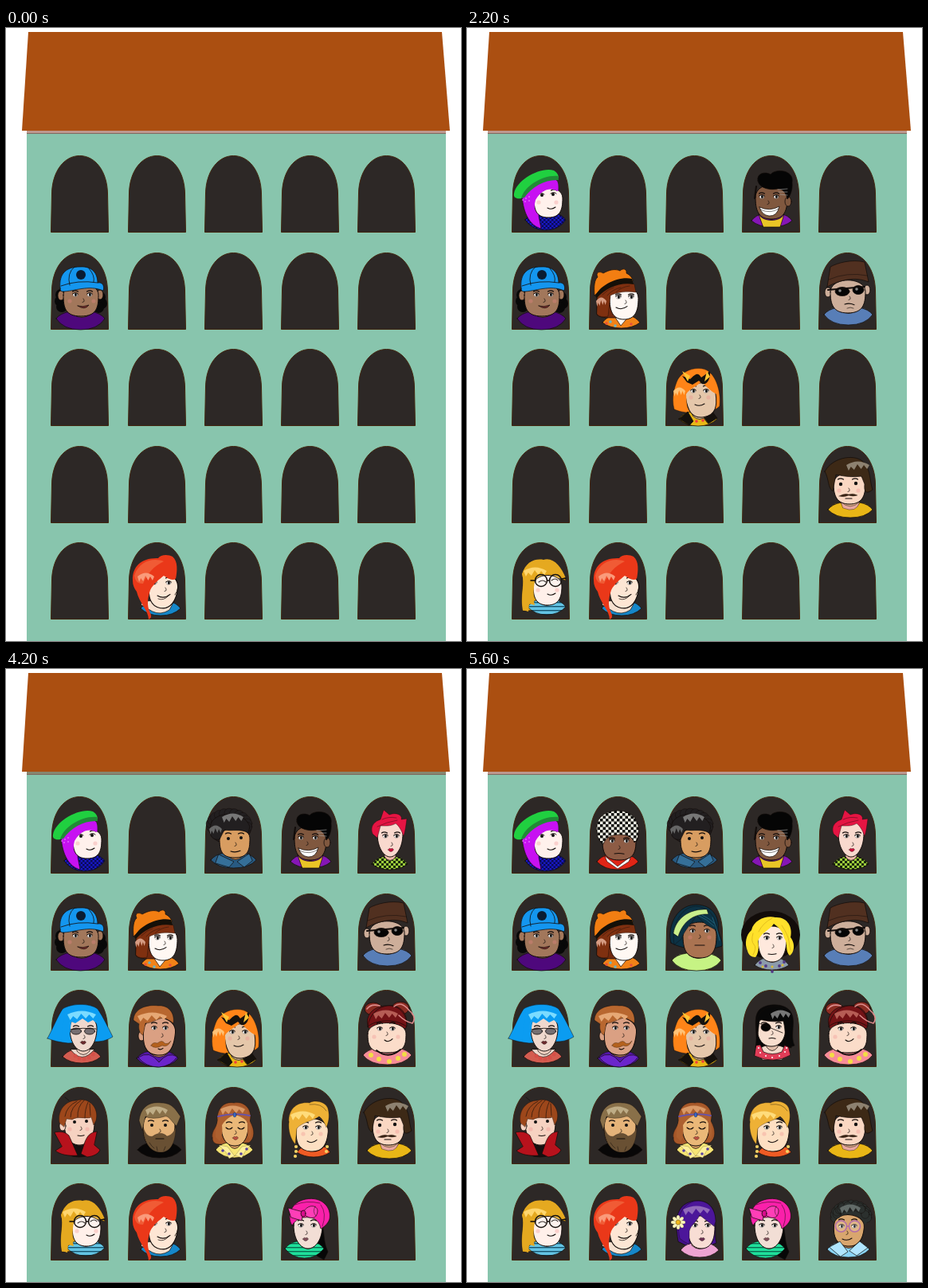
An HTML page that plays this animation: 571x770 px, repeating every 6100 ms.

```html
<!DOCTYPE html>
<html lang="en">
<head>
<meta charset="utf-8">
<title>Neighbours</title>
<style>
html, body { margin: 0; width: 100%; height: 100%; overflow: hidden; background: #fff; }
svg { display: block; width: 100%; height: 100%; }
</style>
</head>
<body>
<svg id="stage" viewBox="0 0 571 770"></svg>
<script>
const LOOP = 6100;
const colX = [56, 153, 249, 345, 441], rowY = [160, 282, 403, 525, 646];

const shape = (fill, d, w = .7) => `<path d="${d}" fill="${fill}" stroke-width="${w}"/>`;
const line = (d, w = 1) => shape('none', d, w);
const oval = (fill, x, y, rx, ry = rx, w = .8) =>
  `<ellipse cx="${x}" cy="${y}" rx="${rx}" ry="${ry}" fill="${fill}" stroke-width="${w}"/>`;
const dots = (fill, r, ...pts) => pts.map(([x, y]) => oval(fill, x, y, r, r, 0)).join('');
const turn = (deg, x, y, art) => `<g transform="rotate(${deg} ${x} ${y})">${art}</g>`;

// Shoulders from l to r, with a rounded lower edge at b.
function torso(fill, l, r, y, b) {
  const w = r - l, m = (l + r) / 2;
  return shape(fill, `M${l},${y + 9}Q${l + 5},${y + 2} ${l + w * .3},${y}H${r - w * .3}Q${r - 5},${y + 2} ${r},${y + 9}Q${r - 9},${b} ${m},${b}Q${l + 9},${b} ${l},${y + 9}Z`);
}
const neck = (fill, x, y, w = 9) => shape(fill, `M${x - w},${y - 10}V${y}Q${x},${y + 9} ${x + w},${y}V${y - 10}`);
function head(fill, x, y, rx, ry, jaw = .6) {
  return shape(fill, `M${x - rx},${y - ry * .2}C${x - rx},${y - ry * 1.1} ${x + rx},${y - ry * 1.1} ${x + rx},${y - ry * .2}C${x + rx},${y + ry * .5} ${x + rx * jaw},${y + ry} ${x},${y + ry}C${x - rx * jaw},${y + ry} ${x - rx},${y + ry * .5} ${x - rx},${y - ry * .2}Z`, 1);
}
const brows = (x, y, gap) => [-1, 1].map(s => line(`M${x + s * (gap - 3.5)},${y}q${s * 4},-2.4 ${s * 7},0`, 1.2)).join('');
const eyes = (x, y, gap) => [-gap, gap].map(d =>
  oval('#fff', x + d, y, 2.9, 2.3, .3) + oval('#111', x + d + .4, y, 1.5, 2, 0) + line(`M${x + d - 3.5},${y - 1}q4,-3 7,0`, 1)).join('');
const nose = (x, y) => line(`M${x},${y - 3}q3,4 -1,4.5`, .7);
const smile = (x, y, w = 6, bend = 4) => line(`M${x - w},${y}q${w},${bend} ${w * 2},${-bend / 3}`, 1.1);
const lips = (fill, x, y) => shape(fill, `M${x - 3.5},${y}q2,-3 3.5,-1q2,-2 3.5,1q-3.5,5 -7,0z`, .4);
const blush = (x, y, gap) => dots('#f08a8a50', 2.6, [x - gap, y], [x + gap, y]);
const looks = (x, y, gap, drop = 15, bend = 4) =>
  blush(x, y + 8, gap + 3) + brows(x, y - 6, gap) + eyes(x, y, gap) + nose(x, y + 8) + smile(x, y + drop, 6, bend);
const shine = (fill, x, y, w) => shape(fill, `M${x},${y}q${w / 2},-9 ${w},0l${-w * .1},5l${-w * .14},-5l${-w * .12},5l${-w * .16},-6l${-w * .14},7l${-w * .14},-4l${-w * .1},5z`, 0);
const curls = (fill, x, y, rx, ry, n, r, from = .95, sweep = 1.1) => Array.from({ length: n }, (_, i) => {
  const a = Math.PI * (from + sweep * i / (n - 1));
  return oval(fill, x + rx * Math.cos(a), y + ry * Math.sin(a), r, r, .4);
}).join('');
const specs = (x, y, gap, r, color) =>
  `<g stroke="${color}">${oval('#ffffff30', x - gap, y, r, r, 1.5)}${oval('#ffffff30', x + gap, y, r, r, 1.5)}${line(`M${x - gap + r},${y}h${2 * (gap - r)}`, 1.5)}</g>`;

// Each resident: row, column, moments of appearing or leaving, drawing in window coordinates.
const people = [
  [0, 0, [1200], () => torso('url(#plaid)', 17, 68, 72, 94)
    + shape('#c711f2', 'M13,52C20,36 42,26 56,30L60,48C48,44 42,46 36,52L34,76L37,92C22,88 15,72 13,52Z')
    + head('#fff1ec', 46, 58, 18, 20, .85) + brows(45, 44, 8) + dots('#111', 2, [38, 50], [52, 49])
    + line('M34,49q4,-3 7,0M49,48q4,-3 7,0', 1) + blush(45, 59, 11) + smile(50, 66, 5, 3)
    + shape('#c711f2', 'M20,46C30,32 48,28 57,32C59,36 59,42 58,45C49,40 38,42 30,56C27,68 29,76 35,90C25,84 18,66 20,46Z', 0)
    + dots('#f3a5ff', .8, [14, 56], [18, 54], [22, 52], [17, 58], [22, 57])
    + shape('#20d040', 'M3,48C6,31 36,14 53,19C58,22 60,27 58,30C42,28 24,38 12,54C6,55 2,53 3,48Z', 0)
    + shape('#218a37', 'M12,54C16,38 40,24 58,26L59,31C42,30 26,39 16,53Z', 0)],

  [0, 1, [5400], () => torso('#e02516', 10, 62, 73, 92) + shape('#fff', 'M20,75L36,88L53,75L50,82L36,91L23,82Z', .6)
    + neck('#7f503b', 37, 75) + oval('#080808', 37, 50, 25, 16) + head('#8d5c45', 38, 59, 21, 21, .9) + brows(38, 53, 9) + eyes(38, 56, 9)
    + nose(38, 65) + smile(38, 72, 6, -1)
    + shape('url(#check)', 'M10,46C6,28 20,18 36,18C54,18 64,30 62,46C62,52 60,56 57,58C55,51 48,48 38,48C27,48 21,52 18,60C13,57 11,52 10,46Z')],

  [0, 2, [3400], () => torso('#285a82', 8, 65, 71, 90) + neck('#bd844f', 39, 75)
    + oval('#221f20', 32, 38, 27, 22) + head('#d89d61', 38, 57, 19, 20, .9) + brows(38, 47, 8) + dots('#111', 2, [30, 53], [46, 52])
    + nose(39, 61) + smile(39, 69, 6, 2)
    + curls('#221f20', 31, 36, 23, 15, 13, 6) + shape('#221f20', 'M9,32C18,18 50,18 57,38L55,46C46,40 34,44 25,42L19,54C8,56 4,46 9,32Z')
    + shine('#777', 22, 26, 27) + shine('#666', 6, 41, 16)
    + shape('#356f98', 'M18,73L37,82L31,89L14,84ZM56,72L41,82L50,89L60,81Z')],

  [0, 3, [400], () => torso('#8516b5', 12, 63, 73, 90) + shape('#e9c526', 'M21,74C26,84 48,84 53,74L48,90H27Z') + neck('#69472f', 37, 76)
    + head('#80583f', 37, 57, 20, 23, .85) + oval('#80583f', 58, 58, 4, 6)
    + brows(34, 48, 9) + eyes(34, 52, 9) + nose(33, 60)
    + shape('#fff', 'M22,65Q35,71 47,64Q44,77 34,76Q25,75 22,65Z') + line('M23,68Q36,74 46,67', .5)
    + shape('#050505', 'M20,32C18,22 30,20 36,24C42,16 66,18 63,34C64,44 60,52 57,55C55,46 51,42 45,42C36,44 22,42 20,32Z') + line('M16,54L18,39', 2)
    + `<g stroke="#aaa">${line('M45,43l12,-1M46,46l11,0M48,49l9,1', .6)}</g>`],

  [0, 4, [2600], () => torso('url(#lime)', 18, 63, 76, 92) + neck('#eeb9a9', 41, 76, 7)
    + head('#f9d9ce', 41, 52, 16, 24, .5) + brows(42, 46, 8) + eyes(42, 50, 7) + nose(43, 61) + lips('#d4103c', 42, 67)
    + shape('#e51543', 'M19,47C15,36 23,31 29,29L33,17L40,23C51,19 57,25 55,29L62,28C61,36 60,44 58,50C55,42 52,37 48,34C42,38 34,37 29,37L25,52Z', .4)
    + line('M25,38q12,-6 25,-8M31,29q8,-4 18,-2', .4)],

  [1, 0, [0, 200, 1400], () => dots('#080808', 7, [13, 53], [12, 61], [14, 68], [62, 56], [64, 64], [60, 69])
    + torso('#4e087c', 7, 68, 74, 97) + neck('#805c45', 39, 77, 12) + oval('#a2775b', 13, 54, 4, 6) + oval('#a2775b', 62, 53, 4, 6)
    + head('#a2775b', 38, 58, 22, 22, .9) + brows(40, 49, 9) + eyes(40, 53, 9) + nose(41, 61) + blush(39, 61, 15)
    + shape('#7e2d2d', 'M34,67Q41,69 48,66Q43,73 34,67Z', .7)
    + shape('#1496ef', 'M12,45C10,26 20,18 37,18C53,17 59,27 59,38C65,37 68,42 66,48C48,40 29,49 15,49Q12,49 12,45Z')
    + line('M13,42Q34,34 59,38M30,18Q20,26 24,41M48,20Q56,29 54,37', .8) + oval('#0a1c33', 38, 28, 6, 6, 0)],

  [1, 1, [600], () => torso('#f28218', 17, 64, 79, 95) + shape('#fff6ef', 'M32,80L40,92L51,79Z')
    + shape('#71290e', 'M10,46C18,34 48,30 57,46L61,72L34,82C22,82 12,82 10,78Z')
    + head('#fff8f3', 44, 62, 18, 22, .8) + brows(45, 53, 8) + eyes(45, 56, 8) + nose(46, 63) + smile(41, 69, 7, 4)
    + shape('#7f3010', 'M11,52C20,36 48,32 57,40L59,50C47,48 35,50 27,54L24,80C17,82 12,80 10,77Z', .4)
    + line('M17,53q7,-7 14,-9M23,54q7,-8 17,-10M34,50q7,-7 17,-8', .4) + shine('#d69c83', 9, 61, 13)
    + shape('#f27e12', 'M7,54C6,42 7,34 11,31C8,25 13,23 18,26C25,22 33,20 39,23C43,19 48,21 47,26C53,29 55,33 55,36C38,33 22,40 7,54Z')
    + shape('#151008', 'M8,55C13,41 38,29 54,33L56,40C39,37 22,44 10,57Z', 0)
    + dots('#68b3c4', 1.8, [27, 87], [33, 92]) + dots('#e6503c', 1.7, [53, 90], [22, 89])],

  [1, 2, [4600], () => shape('#0c3244', 'M7,62C2,46 11,15 38,14C62,14 68,33 66,45C69,55 72,60 71,66C56,72 24,72 7,62Z')
    + torso('#c6f384', 8, 70, 75, 97) + neck('#895337', 41, 77, 12) + head('#aa7351', 43, 57, 21, 24, .85) + looks(43, 47, 9, 18, 0)
    + shape('#0c3244', 'M11,64C7,43 18,17 38,16C56,17 65,32 64,46C54,42 44,34 39,27C32,40 25,44 20,57Z', .4)
    + shape('#c9ef8c', 'M10,50C13,31 30,19 52,20L54,26C37,25 22,34 16,54Z', .5)
    + `<g stroke="#287089">${line('M42,28q10,4 19,13M46,27q10,5 15,10M59,30q6,14 9,29', .7)}</g>`],

  [1, 3, [4800], () => curls('#f4d21d', 35, 54, 26, 21, 17, 8, .72, 1.56) + torso('#8c9bab', 16, 59, 81, 96) + neck('#eccbbf', 38, 82)
    + oval('#f4d21d', 36, 52, 27, 20, 20, 0) + head('#ffe9dd', 38, 62, 18, 24, .7)
    + brows(39, 51, 8) + eyes(39, 56, 8) + nose(39, 67) + smile(38, 76, 5, 1)
    + shape('#ffe12b', 'M7,72C3,63 5,52 12,46C15,32 32,27 42,30C57,29 64,42 61,55C68,64 65,75 60,78C54,73 58,62 53,56C51,46 45,42 40,38C35,46 24,49 20,60C22,68 20,77 17,80C12,80 8,77 7,72Z', 0)
    + `<g stroke="#cfa316">${line('M14,50q-3,10 1,14t-1,13M50,40q8,12 9,20t2,11M38,31q-12,6 -17,17', .6)}</g>`
    + dots('#523b85', 1.9, [23, 87], [30, 91], [38, 98], [47, 91], [53, 86]) + dots('#d8bd32', 1.5, [26, 92], [38, 92], [51, 90])],

  [1, 4, [1000], () => torso('#587eb7', 7, 68, 69, 91) + neck('#ad8d7a', 38, 72, 11)
    + oval('#cdae9a', 12, 50, 4, 6) + oval('#cdae9a', 61, 47, 4, 6) + head('#cdae9a', 37, 54, 22, 22, .85)
    + oval('#050505', 30, 49, 9, 5.5) + oval('#050505', 50, 47, 7, 5.5) + line('M12,47L58,43', 2)
    + dots('#888', 1.8, [27, 48], [48, 46]) + nose(39, 58) + smile(39, 65, 6, -2) + line('M36,70q4,-2 8,0', .6)
    + shape('#513020', 'M11,43L15,18C24,13 42,8 58,12L63,37C46,30 28,34 11,43Z') + line('M13,34Q36,24 61,29', .5)],

  [2, 0, [2400], () => shape('#0b9cf1', 'M-4,61C3,48 9,33 15,24C26,17 48,16 59,24C66,34 73,49 78,59C70,64 63,65 57,65L22,67C12,66 3,64 -4,61Z', .5)
    + torso('#d35c50', 15, 63, 75, 92) + shape('#efd8cd', 'M25,75Q39,94 55,75Z') + neck('#edcebf', 41, 77, 8) + head('#efd8cd', 41, 53, 17, 24, .55)
    + brows(41, 46, 9) + oval('#766f72', 32, 52, 6.5, 4) + oval('#766f72', 49, 52, 6.5, 4) + line('M23,50q18,-3 34,-1', .9)
    + nose(42, 60) + lips('#702c2f', 41, 66)
    + shape('#0b9cf1', 'M18,27C33,20 52,20 61,28L60,44L53,38L47,41L40,36L31,42L26,40L23,64L13,64Z', 0)
    + shine('#7bdbff', 21, 31, 36) + dots('#d64f47', 2.5, [31, 83], [36, 86], [42, 87], [48, 85], [53, 81])],

  [2, 1, [3000, 4600, 5600], () => torso('#5417a8', 11, 63, 77, 97) + neck('#bb8061', 39, 80, 11)
    + oval('#daa083', 17, 58, 4, 6) + turn(5, 38, 59, head('#daa083', 39, 57, 20, 25, .8)) + brows(40, 42, 7)
    + eyes(40, 48, 7) + nose(43, 58)
    + shape('#b4611e', 'M29,70Q31,65 37,67Q43,62 46,67Q50,69 54,64Q50,73 43,70Q34,75 29,70Z', .3) + smile(41, 74, 3, 2)
    + shape('#b8672f', 'M7,38C7,24 23,18 38,20C51,19 59,29 57,42C52,38 48,36 44,35C36,37 29,42 22,42L19,57C14,55 13,47 14,43Z', .4) + shine('#e6a875', 12, 33, 37)
    + shape('#6b25cb', 'M13,85Q27,75 39,91Q50,77 62,84Q54,96 39,97Q22,97 13,85Z')],

  [2, 2, [800], () => shape('#ff8418', 'M11,76C7,60 12,48 14,42C20,25 45,20 55,29C65,37 70,57 68,72C57,83 27,83 11,76Z', .4)
    + torso('#e8b816', 17, 65, 79, 97) + shape('#15110d', 'M17,88L28,79L35,91L30,96ZM46,84L59,79L65,87L54,94Z')
    + neck('#d9b692', 43, 84) + turn(-8, 45, 64, head('#e5c7aa', 45, 63, 19, 23, .8)) + looks(43, 53, 8, 17, 3)
    + shape('#ff8418', 'M13,72C9,47 18,29 36,27C53,24 66,38 66,58C56,53 50,46 45,41C39,48 30,50 26,57L27,76Z', 0) + shine('#ffc276', 10, 53, 15)
    + shape('#16120d', 'M21,34L31,38C38,31 41,29 45,36L56,28C57,38 52,46 46,44L42,40L34,45L27,42Z', 0)
    + shape('#ffc535', 'M21,28L31,34L28,41ZM52,28L56,35L49,41Z', 0) + dots('#f03d3d', 1.8, [39, 91], [47, 90])],

  [2, 3, [5400], () => shape('#080808', 'M17,72C21,53 12,34 23,24C34,16 56,17 62,29C68,39 60,59 66,70L54,74H21Z')
    + shape('#f3dacb', 'M18,76Q37,62 60,76L50,88H26Z') + shape('#e13c57', 'M18,70L23,69L27,78Q38,83 50,78L54,69L58,70L61,82Q40,94 16,83Z')
    + neck('#dfbda9', 38, 72, 7) + head('#f7dece', 37, 51, 18, 20, .65)
    + brows(37, 42, 9) + eyes(38, 47, 8) + nose(38, 55) + smile(38, 61, 4, -1) + oval('#050505', 30, 47, 6, 5) + line('M19,41L51,54', .8)
    + shape('#080808', 'M18,45C18,28 29,20 45,21C59,23 63,37 60,55L62,73L54,70C55,58 54,47 52,39C40,41 29,39 22,37L20,56Z') + shine('#777', 36, 30, 25)
    + dots('#fff', 1, [21, 73], [23, 79], [30, 83], [38, 85], [47, 83], [54, 78], [56, 73])],

  [2, 4, [3600], () => oval('#8b2d23', 20, 24, 11, 8) + oval('#8b2d23', 54, 23, 11, 8)
    + shape('#731316', 'M14,48C7,30 24,19 38,20C54,18 65,30 61,48Z') + torso('#f78c98', 7, 68, 73, 94) + neck('#e4b59d', 38, 75, 12)
    + head('#fbdcc9', 37, 59, 24, 20, .95) + brows(36, 42, 8) + eyes(36, 49, 8) + nose(37, 56) + blush(36, 59, 15) + smile(39, 63, 5, 4)
    + shape('#731316', 'M13,46C15,30 27,21 38,20C52,19 62,30 62,46C55,42 49,39 38,39C28,39 19,41 13,46Z') + shine('#b65d55', 20, 30, 31)
    + `<g stroke="#dc8b8b">${line('M12,24Q17,17 28,20M46,21Q55,13 65,26Q75,34 69,42Q60,40 52,32', 1.6)}</g>`
    + dots('#f3dc45', 3, [17, 82], [27, 87], [51, 86], [59, 81], [40, 90]) + line('M24,76Q39,88 54,75', 1.8)],

  [3, 0, [2600], () => torso('#151010', 12, 59, 69, 88) + neck('#e6b09a', 37, 69)
    + head('#f6d2c1', 36, 50, 19, 23, .6) + oval('#f6d2c1', 15, 49, 4, 6) + brows(37, 38, 8) + dots('#111', 2, [30, 44], [45, 43])
    + blush(35, 53, 11) + nose(38, 53) + smile(38, 61, 4, 1)
    + shape('#9d471b', 'M11,45C8,28 20,17 32,17C49,12 61,27 57,42L54,48L51,38C44,41 34,36 27,41L20,40L17,50Z', .4)
    + line('M18,37Q20,24 33,18M25,38Q25,25 38,17M34,38Q33,25 42,17M43,39Q43,28 47,19M50,36L49,21M23,17l-5,-4', .6)
    + shape('#b7121c', 'M5,57C13,55 19,57 23,61L34,86C22,87 12,85 6,80L14,75ZM58,56C49,57 46,62 43,69L38,84L46,88C54,87 60,84 62,79L55,73Z')],

  [3, 1, [3800], () => torso('#080707', 12, 67, 70, 89) + neck('#c68b51', 39, 72, 11)
    + head('#e5b379', 39, 53, 20, 25, .8)
    + shape('#695033', 'M19,50C22,61 27,63 31,62C38,57 44,57 49,62C56,60 58,56 60,50C60,69 54,81 43,82C28,83 20,70 19,50Z', .3)
    + brows(38, 43, 9) + dots('#111', 2, [30, 48], [47, 48]) + nose(40, 56) + smile(40, 65, 5, 0)
    + shape('#897049', 'M14,42C16,25 27,18 42,20C56,20 60,29 66,37L61,49C55,44 51,35 46,37C37,40 27,40 22,37L18,54Z', .4) + shine('#beac86', 22, 29, 28)
    + line('M27,70q3,5 6,7M36,75l1,5M47,75l-2,5', .5)],

  [3, 2, [3200], () => shape('#a75829', 'M10,64C8,54 18,50 16,39C17,25 26,18 37,20C52,17 61,31 57,43C64,54 63,65 56,70L19,72C13,72 10,69 10,64Z', .4)
    + torso('#f6e575', 14, 61, 70, 89) + neck('#d89e61', 38, 73, 7) + head('#eab878', 38, 53, 17, 21, .65)
    + brows(39, 45, 8) + line('M27,51q4,4 8,0M42,51q4,4 8,0', 1.1) + nose(39, 58) + lips('#c35444', 39, 64)
    + shape('#ad602f', 'M14,63C13,52 18,40 20,31C28,20 50,20 55,32C57,46 61,54 57,66C52,60 56,48 53,43C48,38 43,36 38,35C30,38 25,43 22,48C23,57 22,66 19,68Z', 0) + shine('#d99966', 20, 28, 31)
    + `<g stroke="#6552ad">${line('M17,37Q38,32 57,36', 1.8)}</g>` + oval('#3a67c2', 38, 35, 2, 3, .3)
    + shape('#fff09a', 'M18,73L29,75L38,87L47,75L58,73L51,81L47,89L39,86L31,90L27,82Z', .2) + dots('#5740a0', 1.8, [23, 80], [31, 84], [46, 84], [53, 78])],

  [3, 3, [4200], () => torso('#ef5b24', 20, 62, 73, 88) + neck('#efbd98', 42, 76, 11)
    + turn(5, 39, 59, head('#fddfc2', 39, 59, 20, 22, .8)) + looks(39, 51, 8, 17, 4)
    + shape('#eeb136', 'M10,44C9,27 21,18 36,20C42,16 56,18 59,27C62,38 59,46 57,51C55,45 52,40 48,37C40,43 27,44 20,52L18,72C12,65 9,55 10,44Z', .3)
    + shine('#ffdc7b', 12, 35, 31) + line('M36,22Q51,20 57,30', .4)
    + dots('#f4d264', 2.1, [19, 75], [19, 81], [18, 87], [58, 75], [57, 81])],

  [3, 4, [1800, 4800, 5600], () => torso('#e9b616', 12, 68, 71, 90) + neck('#d5a584', 40, 73, 11) + shape('#e8a7a0', 'M28,70Q40,82 52,70Q48,85 31,78Z', .4)
    + head('#fad7c2', 39, 52, 20, 21, .8) + brows(37, 42, 9) + dots('#111', 2.2, [28, 48], [47, 47]) + nose(38, 56) + blush(38, 56, 12)
    + shape('#3b2414', 'M26,63Q33,59 38,61Q44,59 49,62Q43,64 38,62Q32,65 26,63Z', .3) + smile(38, 66, 4, 0)
    + shape('#3d2916', 'M8,32C18,13 49,9 58,22C66,32 64,43 68,55C60,61 57,58 58,48L54,38C38,40 28,37 22,36L18,57C11,51 14,43 8,32Z') + shine('#8d8170', 35, 24, 29)],

  [4, 0, [2200, 4400, 5600], () => shape('#dda019', 'M14,86C10,66 17,51 13,40C18,25 28,21 40,22C53,19 65,35 68,48L59,45L51,74L31,85Z', .4)
    + torso('url(#stripe)', 20, 68, 72, 91) + neck('#f0d3ca', 44, 75)
    + head('#fff0ea', 45, 59, 18, 20, .8) + line('M34,50q5,-4 9,0M50,48q5,-4 8,0', 1.1) + smile(50, 65, 5, 3) + blush(45, 60, 12)
    + shape('#e5a920', 'M14,85C11,65 17,53 13,40C18,25 28,20 40,22C52,18 62,30 68,45L60,41C47,37 35,42 30,42C28,54 26,69 29,79L22,77L21,87Z', 0)
    + shine('#ffd66e', 15, 36, 29) + specs(46, 48, 9, 7.5, '#18130f') + line('M24,48L30,48M63,46L68,45', 1.5)],

  [4, 1, [0, 1600, 2000], () => torso('#1687c9', 16, 66, 74, 92) + shape('#f6e0cf', 'M16,78Q23,72 31,74Q45,92 58,74L52,85Q41,92 31,87Z')
    + turn(8, 45, 61, head('#fde6d4', 44, 60, 18, 23, .7)) + brows(42, 45, 9) + eyes(42, 51, 9) + nose(47, 60) + smile(45, 67, 8, 5) + line('M38,71q7,3 13,-4', .7)
    + shape('#ea3819', 'M6,48C5,30 18,19 38,20C41,15 51,15 56,18C63,24 62,36 60,46C55,49 50,45 45,42C40,46 32,52 28,60C25,70 23,78 28,89Q31,94 26,97C26,86 14,76 11,62C8,58 6,54 6,48Z', 0)
    + shape('#f05b35', 'M8,42C14,23 32,19 45,24C32,30 24,40 19,52Q9,52 8,42Z', 0) + shine('#fa9b7b', 12, 43, 21)
    + line('M60,46Q66,57 59,66', .8)],

  [4, 2, [4600], () => shape('#43108a', 'M16,73C13,55 12,39 21,29C35,17 56,20 61,36C65,51 61,65 64,75L51,80L26,78Z')
    + torso('#eda3d2', 19, 67, 75, 93) + neck('#e3b9ac', 43, 78, 10) + head('#f8ddd4', 45, 60, 17, 22, .7)
    + brows(45, 48, 8) + eyes(45, 53, 8) + nose(46, 62) + lips('#713356', 46, 70)
    + shape('#4c169a', 'M18,69C13,46 18,29 35,23C54,19 63,33 63,48L61,54C53,48 48,44 43,40C39,49 32,52 30,60L30,77L23,73Z', .4) + shine('#916aba', 22, 33, 34)
    + Array.from({ length: 8 }, (_, i) => turn(i * 45, 16, 49, oval('#fff7ba', 16, 43.5, 2.2, 3.6, .2))).join('') + oval('#f2b91c', 16, 49, 3, 3, .3)],

  [4, 3, [3200], () => shape('#070707', 'M47,47C57,53 51,70 59,86L54,96L45,91L43,65Z') + torso('url(#mint)', 5, 54, 73, 94) + neck('#d9bcae', 34, 78)
    + head('#f2ded5', 34, 58, 18, 24, .55) + brows(33, 47, 8) + eyes(33, 53, 8) + nose(32, 63) + lips('#86535f', 31, 70)
    + shape('#fa20aa', 'M14,53C6,40 14,23 31,20C52,16 64,31 61,45C59,51 53,56 50,57C48,48 44,44 36,43C26,42 19,45 14,53Z')
    + shape('#ff3eb7', 'M9,31L28,36L26,47L13,43ZM29,35C34,26 46,27 46,35C45,45 37,46 29,39Z') + oval('#d80d8c', 28, 38, 3, 4)
    + line('M18,27Q32,21 49,25M50,27Q58,38 52,54M43,29Q39,36 44,41', .5)],

  [4, 4, [5000], () => curls('#2b302e', 41, 41, 20, 14, 13, 6) + oval('#2b302e', 40, 42, 23, 17, 0)
    + torso('#8bd5f9', 11, 64, 74, 93) + neck('#b17a4c', 38, 77) + turn(5, 38, 59, head('#d9a66e', 38, 58, 19, 21, .75))
    + brows(37, 46, 8) + eyes(37, 54, 8) + nose(36, 63) + smile(36, 70, 6, 3)
    + curls('#2b302e', 41, 38, 18, 8, 10, 5) + curls('#2b302e', 41, 32, 13, 4, 6, 5) + shine('#626b68', 27, 31, 26) + specs(37, 54, 8.5, 7, '#b06ba9')
    + shape('#b0e5ff', 'M14,80L27,73L37,86L28,92ZM52,73L62,81L48,91L39,85Z')]
];

const pattern = (id, size, back, art) =>
  `<pattern id="${id}" width="${size}" height="${size}" patternUnits="userSpaceOnUse"><path fill="${back}" d="M0,0H${size}V${size}H0Z"/>${art}</pattern>`;
const squares = (id, h, a, b) => pattern(id, 2 * h, a, `<path fill="${b}" d="M0,0H${h}V${h}H0ZM${h},${h}h${h}v${h}h${-h}Z"/>`);
const bands = (id, size, a, b) => pattern(id, size, a, `<path fill="${b}" d="M0,0H${size}V1.4H0Z"/>`);
const at = (r, c, art, id = '') => `<g ${id} transform="translate(${colX[c]} ${rowY[r]})">${art}</g>`;

const arch = '<path fill="#2d2826" stroke="#43260f" d="M.5,96.5L1.5,48C2,20 17,.5 36.5,.5S71,20 71.5,48L72.5,96.5Z"/>';
const windows = rowY.map((_, r) => colX.map((_, c) => at(r, c, arch)).join('')).join('');

const stage = document.getElementById('stage');
stage.innerHTML = `<defs>${squares('check', 3.5, '#f4f4e6', '#0c0c0c')}${squares('lime', 3, '#9ccb3b', '#1b2a0d')}${squares('plaid', 2.5, '#1717c4', '#0a0a55')}
${bands('stripe', 5, '#64c4e4', '#17546e')}${bands('mint', 5, '#1fe09b', '#0b6b50')}</defs>
<path fill="#88c5ad" d="M26,129H552V770H26Z"/>
<path id="eaves" d="M26,129H552V133H26Z"/>
<path fill="#7d6a60" d="M26,132H552V133H26Z"/>
<path fill="#ab4f11" d="M28,5H547L557,129H20Z"/>
${windows}<g stroke="#120c0a" stroke-linecap="round" stroke-linejoin="round">
${people.map(([r, c, , draw]) => at(r, c, draw(), 'class="person"')).join('')}</g>`;

const eaves = document.getElementById('eaves');
const figures = stage.querySelectorAll('.person');

function frame() {
  const t = performance.now() % LOOP;
  people.forEach(([, , toggles], i) => {
    const visible = toggles.filter(time => time <= t).length % 2;
    figures[i].style.display = visible ? '' : 'none';
  });
  eaves.setAttribute('fill', t >= 4200 && t < 4400 ? '#87866f' : '#bd988e');
  requestAnimationFrame(frame);
}
frame();
</script>
</body>
</html>
```
